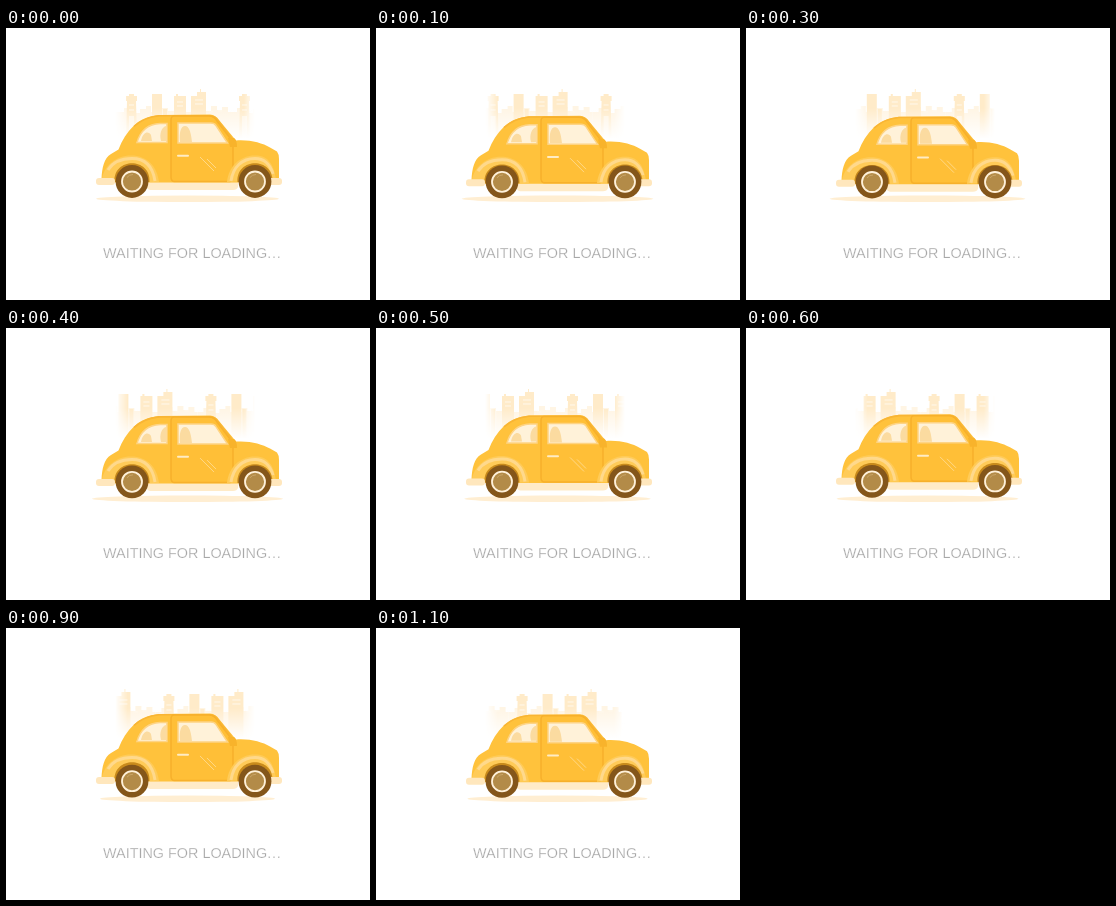
These frames come from a looping animation (364 px wide and 272 px high, 1.2 s). An HTML page:

```html
<!DOCTYPE html>
<html lang="en">
<head>
<meta charset="utf-8">
<title>Waiting for loading</title>
<style>
  html, body { margin: 0; width: 100%; height: 100%; overflow: hidden; background: #fff; }
  svg { display: block; width: 364px; height: 272px; }
  text { font: 14.4px "Liberation Sans", Arial, sans-serif; fill: #a8a8a8; stroke: #fff; stroke-width: .25; }
  .dots { letter-spacing: .8px; }
</style>
</head>
<body>
<svg viewBox="0 0 364 272">
  <defs>
    <linearGradient id="sides" gradientUnits="userSpaceOnUse" x1="109" x2="249">
      <stop offset="0" stop-color="#fff" stop-opacity="0"/>
      <stop offset=".09" stop-color="#fff"/>
      <stop offset=".92" stop-color="#fff"/>
      <stop offset="1" stop-color="#fff" stop-opacity="0"/>
    </linearGradient>
    <linearGradient id="haze" x2="0" y2="1">
      <stop offset="0" stop-color="#fff" stop-opacity="0"/>
      <stop offset="1" stop-color="#fff"/>
    </linearGradient>
    <mask id="fade" maskUnits="userSpaceOnUse" x="105" y="55" width="150" height="60">
      <rect x="105" y="55" width="150" height="60" fill="url(#sides)"/>
    </mask>
    <!-- one repeat of the skyline -->
    <g id="block">
      <path fill="#fff5e4" d="M112 112V84h6v-4h8v5h8v-4h6v-3h5v6h11v-4h6v3h8v-4h9v5h9v-5h12v4h5v-5h6v4h5v-3h6v5h3v28z"/>
      <path fill="#ffebc9" d="M120 68h3v-2h5v2h3v5h-1l1 37h-3V88h-5v22h-3l1-37h-1z
        M146 110V66h10v44z M157 110V81h4v29z
        M168 110V68h2v-2h2v2h8v42z
        M185 110V68h6v-4h3v-3h1v3h5v46z"/>
      <path stroke="#fff8ec" d="M123 77h5M123 82h5M171 74h6M171 78h6M189 72h8M189 76h8M203 84h4M212 83h4"/>
    </g>
    <g id="wheel">
      <circle r="16.4" fill="#84561a"/>
      <circle r="10" fill="#b38b48" stroke="#fff1d9" stroke-width="1.8"/>
      <path d="M-5-4Q-3-7 1-7" fill="none" stroke="#c9a568"/>
    </g>
  </defs>

  <g mask="url(#fade)">
    <g id="city">
      <use href="#block" x="-113"/>
      <use href="#block"/>
      <use href="#block" x="113"/>
    </g>
    <rect x="105" y="80" width="150" height="31" fill="url(#haze)"/>
    <rect x="105" y="110" width="150" height="5" fill="#fff"/>
  </g>

  <ellipse id="shadow" cx="181.5" cy="170.8" ry="3.3" fill="#ffeed2"/>

  <g id="body">
    <path fill="#ffebc8" d="M139 151H232V159Q231 162 227 162H144Q140 161 139 155z"/>
    <path fill="#ffc23c" d="M95.5 151C96 140 98 130 105 126L112.5 121.5C116 112 121 104 128 97.5C135 91 143 88 153 87L204 86.5Q210 87 213 92L230 112.5C244 111.5 256 115 264 119.5L271 123.5Q273 126 273 131V151L262 154.5H108z"/>
    <path fill="none" stroke="#f9b534" stroke-width="1.6" d="M128 98.5C135 92 143 88.8 153 87.8H204Q209 88 212 92.5L228 113"/>
    <path fill="#ffbf37" stroke="#f7b02b" stroke-width="1.5" d="M168 88H203Q208 88 211 93L227 114V150L224 153.5H168Q165 153 165 149V92Q165 88 168 88z"/>
    <path fill="#fff2d9" stroke="#fed484" stroke-width="1.5" d="M131 114.5C134 104 141 96 154 95.5H161V114.5z
      M172 95H205Q208.5 95 210 97.5L221.5 115H172z"/>
    <path fill="#fbdba0" d="M135 113C137 103 143 103 145 107L146 113z M155 113C153 105 156 99 160 98V113z
      M174 114C173 104 175 98 179 98C183 98 185 104 186 114z"/>
    <path fill="#f8b32b" d="M222 110h6q3 2 3 9h-7z"/>
    <path stroke="#ffecc4" stroke-width="2" stroke-linecap="round" d="M172 127.8H182"/>
    <path stroke="#ffd987" d="M194 129L208 143M201 131L210 140"/>
    <!-- fenders, with the dark wheel wells in them -->
    <path fill="#ffcb58" d="M96 151C98 138 110 127.5 125 127.5C141 127.5 151 138 153 154H96z
      M221 154C223 138 234 127.5 249 127.5C261 127.5 267 134 270 151z"/>
    <path fill="none" stroke="#ffd98c" stroke-width="3" d="M102 142C107 134 115 130.5 126 130.5C140 130.5 147 140 149 153M225 153C227 139 236 130.5 249 130.5C259 130.5 264 136 267 146"/>
    <path fill="#c98b1c" d="M108.5 154C107 129 145 129 143.5 154z M231.5 154C230 129 268 129 266.5 154z"/>
    <g fill="#ffe7bd">
      <rect x="90" y="150" width="19" height="7" rx="3"/>
      <rect x="262" y="150" width="14" height="7" rx="3"/>
    </g>
  </g>

  <g id="wheels">
    <use href="#wheel" x="126" y="153.5"/>
    <use href="#wheel" x="249" y="153.5"/>
  </g>

  <text x="97" y="230">WAITING FOR LOADING<tspan class="dots">...</tspan></text>
</svg>
<script>
  const el = id => document.getElementById(id);
  const move = (id, x, y) => el(id).setAttribute("transform", `translate(${x} ${y})`);

  // Suspension: 1 is fully pressed down, negative is lifted
  function bounce(ms) {
    if (ms < 200) return ms / 200;
    if (ms < 800) return 1 - 1.6 * (ms - 200) / 600;
    return -0.6 * (1200 - ms) / 400;
  }

  function draw(now) {
    const step = Math.floor(now % 1200 / 100);
    const press = bounce(step * 100);
    move("city", -8.4 * step, 0);
    move("body", 0, 2.3 * press);
    move("wheels", 0, 0.7 * press);
    el("shadow").setAttribute("rx", 91.5 + 8.7 * press);
  }

  const start = performance.now();
  function tick() {
    draw(performance.now() - start);
    requestAnimationFrame(tick);
  }
  tick();
</script>
</body>
</html>
```
